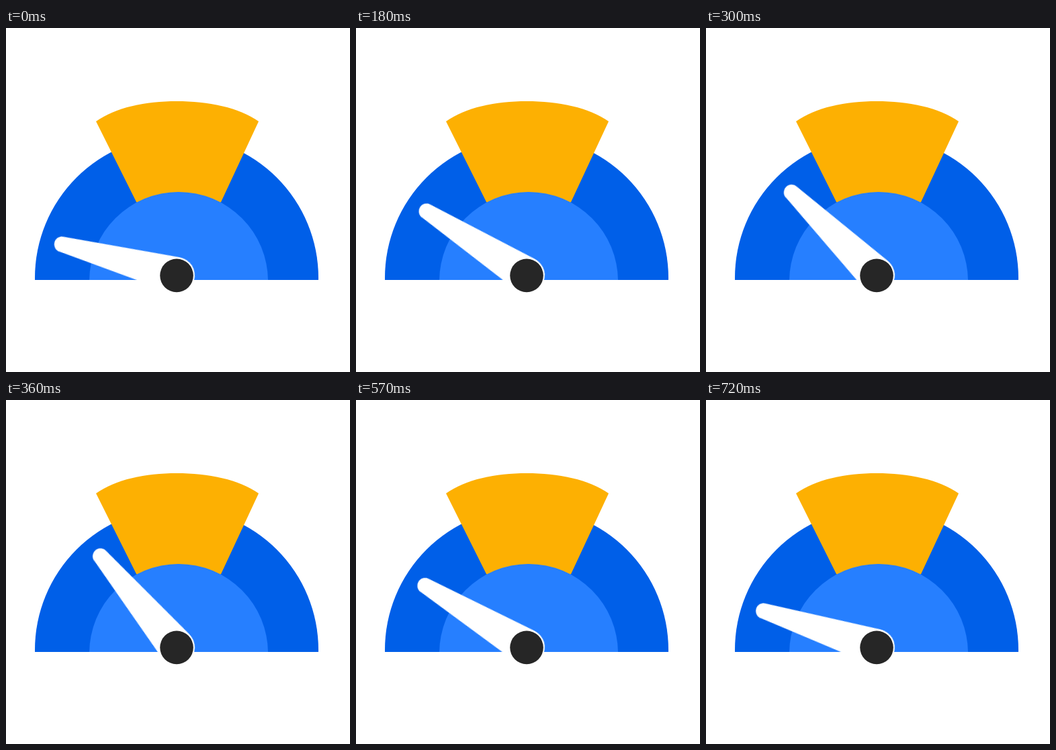
Animation, 512 px wide and 512 px high, one loop 0.75 s. Source, as an HTML page without scripts:

```html
<!DOCTYPE html>
<html lang="en">
<head>
<meta charset="utf-8">
<title>Gauge</title>
<style>
  html, body { margin: 0; width: 100%; height: 100%; overflow: hidden; background: #fff; }
  svg { display: block; width: 100%; height: 100%; }

  /* The small negative delay keeps each 30 ms step clear of its boundary. */
  .needle { transform-origin: 0 0; animation: sweep 750ms -2ms infinite; }

  @keyframes sweep {
    0%   { transform: rotate(15.1deg); animation-timing-function: steps(12, end); }
    48%  { transform: rotate(50.1deg); animation-timing-function: steps(13, end); }
    100% { transform: rotate(15.1deg); }
  }
</style>
</head>
<body>
<svg viewBox="0 0 512 512">
  <clipPath id="dome"><rect width="512" height="375"/></clipPath>
  <g clip-path="url(#dome)">
    <circle cx="254" cy="372" r="211" fill="#005fe8"/>
    <path d="M134 139C164 118 207 109 254 109S346 118 376 139L320 259L257 300L194 259Z" fill="#fdb002"/>
    <circle cx="257" cy="377" r="133" fill="#267fff"/>
  </g>
  <g transform="translate(254 368)">
    <path class="needle" fill="#fff"
      d="M-2.4 -26.9A27 27 0 1 1 -2.4 26.9L-176.8 11.5A11.5 11.5 0 0 1 -176.8 -11.5Z"/>
    <circle cy=".4" r="24.8" fill="#262626"/>
  </g>
</svg>
</body>
</html>
```
